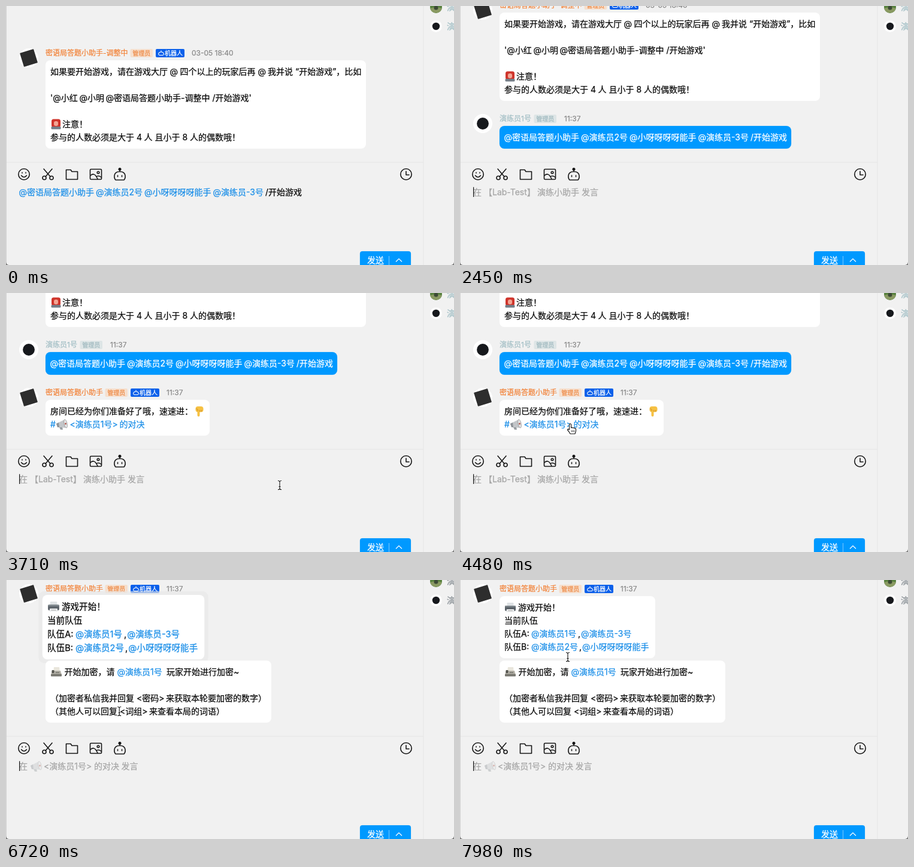
An HTML page for the animation above (8000 ms loop, 748 px wide and 434 px high).

```html
<!DOCTYPE html>
<html lang="zh-CN">
<head>
<meta charset="utf-8">
<title>群聊游戏</title>
<style>
  html, body { margin: 0; width: 100%; height: 100%; overflow: hidden; background: #f1f1f1; }
  svg { display: block; width: 748px; height: 434px; }
  text { font-family: Inter, "Noto Sans CJK SC", sans-serif; text-spacing-trim: space-all; white-space: pre; stroke-width: .25px; }
</style>
</head>
<body>
<svg id="stage" viewBox="0 0 748 434"></svg>
<script>
const LOOP = 8000, STEP = 70;
const BLUE = '#0099ff', LINK = '#1c8fe8', ORANGE = '#f28238', PALE = '#a3bfc5', GRAY = '#8a8a8a', HINT = '#a6a6a6', INK = '#0c0c0c';
const BOT = '密语局答题小助手', P1 = '演练员1号', P2 = '演练员2号', P3 = '演练员-3号', P4 = '小呀呀呀呀能手';

const esc = s => s.replace(/</g, '&lt;').replace(/>/g, '&gt;');
const text = (x, cy, s, fill = INK, size = 14, weight = 400) =>
  `<text x="${x}" y="${cy + size * 0.36}" font-size="${size}" font-weight="${weight}" fill="${fill}" stroke="${fill}">${esc(s)}</text>`;
// parts: [x, string, colour] on one line
const line = (cy, ...parts) => parts.map(([x, s, c]) => text(x, cy, s, c)).join('');
const rect = (x, y, w, h, r, fill, more = '') =>
  `<rect x="${x}" y="${y}" width="${w}" height="${h}" rx="${r}" fill="${fill}" ${more}/>`;
const circle = (x, y, r, fill, more = '') => `<circle cx="${x}" cy="${y}" r="${r}" fill="${fill}" ${more}/>`;
const path = (d, fill = 'none', more = '') => `<path d="${d}" fill="${fill}" ${more}/>`;
const group = (x, y, body, more = '') => `<g transform="translate(${x} ${y})" ${more}>${body}</g>`;
const RIM = `stroke="${BLUE}" stroke-opacity=".2"`;
const bubble = (y, w, lines, fill = '#fff', more = '') => rect(66, y, w, lines * 22 + 16, 8, fill, more);

// small pictures, centred on their position
const siren = (x, y) => group(x, y,
  rect(-7.5, -8.5, 15, 14, 3.5, '#cf352c') + rect(-3.5, -5, 7, 8, 3, '#f3a594') +
  rect(-8, 4, 16, 4.5, 1.5, '#737d87'));
const horn = (x, y, more) => group(x, y,
  path('M-9 -1L5 -8L8 6L-7 5Z', '#c3c6c9') + path('M-9 -1L-5 -3L-4 5L-7 5Z', '#8f9499') +
  path('M-4 5L-2 9H2L1 5', '#9a9fa3') +
  `<ellipse cx="6.5" cy="-1" rx="2.6" ry="7.2" transform="rotate(-12 6.5 -1)" fill="#e4e5e6" stroke="#999" stroke-width=".8"/>` +
  circle(6.5, -1, 1.5, '#b05a50'), more);
const handDown = (x, y) => group(x, y,
  rect(-6.5, -8, 13, 9.5, 4, '#f6c143') + rect(-3.5, -3, 4, 12, 2, '#f6c143') +
  path('M.8 -2V1M3.6 -2V1M-5.5 -4Q-2 -4 -3 0', 'none', 'stroke="#cc8a22" stroke-width=".9"'));
const printer = (x, y) => group(x, y,
  rect(-5.5, -8, 11, 8, 1, '#dfe3e5') + rect(-9, -3, 18, 9, 2, '#596067') +
  rect(-9, -3, 18, 2.5, 1, '#7d858b') + path('M-6 3H6L7 8H-7Z', '#eceeef') +
  path('M-4 5.5H4', 'none', 'stroke="#aaa"'));
const fax = (x, y) => group(x, y,
  path('M-4 -8H5L6 0H-5Z', '#e9e6dc') + path('M-7 -2H7L9 5V7H-9V5Z', '#b5b2a9') +
  rect(-9, 3.5, 18, 4, 1, '#77766f') + rect(-7.5, -3, 4, 5, 1, '#55554f') +
  path('M-1 1H5', 'none', 'stroke="#696961" stroke-dasharray="1.4 .8" stroke-width="2"'));

const botFace = y => circle(38, y, 16, '#fff') +
  rect(-12, -12, 24, 24, 1, '#2d2d2d', `transform="translate(38 ${y}) rotate(-17)"`);
const userFace = (x, y, r) => circle(x, y, r, '#fff') + circle(x, y, r * 0.62, '#17191d');

const tag = (x, y, bg, fg) => rect(x, y - 7, 37.5, 14, 2, bg) + text(x + 3.7, y, '管理员', fg, 10);
const badge = (x, y) => rect(x, y - 7, 48, 14, 2, '#0b60ea') +
  group(x + 9, y, path('M-2.5 3.5Q-5 3 -4 0Q-3 -2 0 -2Q3 -2 4 0Q5 3 2.5 3.5ZM0 -2V-4.5', 'none', 'stroke="#fff" stroke-width="1.1"')) +
  text(x + 15, y, '机器人', '#fff', 10, 500);
const botHead = (y, name, end, time, admin = true) => {
  const b = admin ? end + 47 : end + 5;
  return botFace(y + 8) + text(66, y, name, admin ? ORANGE : GRAY, 12) +
    (admin ? tag(end + 4.5, y, '#f6dfcd', '#ee8a46') : '') + badge(b, y) + text(b + 60, y, time, GRAY, 12);
};

const command = (x, y, c, last) => line(y, [x - 0.5, '@' + BOT, c], [x + 128, '@' + P2, c],
  [x + 209, '@' + P4, c], [x + 323.5, '@' + P3, c], [x + 411, '/开始游戏', last]);

const lobby = `
  ${botHead(79, BOT + '-调整中', 203, '03-05 18:40')}${bubble(91, 535, 6)}
  ${line(110, [74, '如果要开始游戏，请在游戏大厅'], [273.5, '@'], [290.5, '四个以上的玩家后再'], [420.5, '@'], [437, '我并说'], [483, '“开始游戏”，比如'])}
  ${line(154, [74, "'@小红"], [122.5, '@小明'], [166.5, '@' + BOT + '-调整中'], [344.5, "/开始游戏'"])}
  ${siren(83.5, 198)}${text(94, 198, '注意！')}
  ${line(220, [74, '参与的人数必须是大于'], [218, '4'], [230.5, '人'], [248.5, '且小于'], [294.5, '8'], [307, '人的偶数哦！'])}
  <g id="sent">${userFace(38, 277, 16)}${text(66, 269, P1, PALE, 12)}${tag(123.5, 269, '#dde5e6', '#9fb9bf')}${text(174, 269, '11:37', GRAY, 12)}
  ${bubble(281, 487, 1, BLUE, RIM)}${command(74, 300, '#fff', '#fff')}</g>
  <g id="reply">${botHead(349, BOT, 161, '11:37')}${bubble(361, 274, 2)}
  ${text(74, 380, '房间已经为你们准备好了哦，速速进：')}${handDown(323, 380)}
  ${text(74, 402, '#', LINK)}${horn(93, 402)}${line(402, [106.5, `<${P1}>`, LINK], [189.5, '的对决', LINK])}</g>`;

const room = `
  <g id="plainHead">${botHead(15, BOT, 161, '11:37', false)}</g>
  <g id="fullHead">${botHead(15, BOT, 161, '11:37')}</g>
  <g id="pop">${rect(60, 21, 272, 116, 9, '#e8e8e8', 'id="halo"')}${bubble(27, 260, 4)}
  ${printer(84, 46)}${text(97, 46, '游戏开始！')}${text(74, 68, '当前队伍')}
  ${line(90, [74, '队伍A:'], [119, '@' + P1, LINK], [197, ','], [202, '@' + P3, LINK])}
  ${line(112, [74, '队伍B:'], [119, '@' + P2, LINK], [199, ','], [204, '@' + P4, LINK])}</g>
  ${bubble(135, 377, 4)}${fax(84, 154)}
  ${line(154, [97.5, '开始加密，请'], [185.5, '@' + P1, LINK], [268, '玩家开始进行加密~'])}
  ${line(198, [74, '（加密者私信我并回复'], [218, '<密码>'], [267, '来获取本轮要加密的数字）'])}
  ${line(220, [74, '（其他人可以回复'], [190, '<词组>'], [239, '来查看本局的词语）'])}`;

const PEN = 'stroke="#161616" stroke-width="1.6" stroke-linecap="round" stroke-linejoin="round"';
const toolbar = `<g ${PEN} fill="none">
  ${group(30, 282, circle(0, 0, 9.2, 'none') + path('M-4.5 2Q0 7.5 4.5 2M-3 -3V-2M3 -3V-2'))}
  ${group(70, 282, circle(-6, 6, 3, 'none') + circle(6, 6, 3, 'none') + path('M-7 -9L4 4M7 -9L-4 4'))}
  ${group(110, 282, path('M-9 -7.5H-2L0 -4.5H9.5V8.5H-9.5V-7.5Z'))}
  ${group(150, 282, rect(-9.5, -8.5, 19, 17, 1.5, 'none') + circle(4, -3, 1.8, 'none') + path('M-9 2Q-3 -3 1 4Q4 1 9 5M1 4L3 8'))}
  ${group(190, 283, path('M-7 8.5Q-9.5 6 -9 1Q-8 -5.5 0 -5.5Q8 -5.5 9 1Q9.5 6 7 8.5ZM0 -6V-8M-3.5 1V3M3.5 1V3') + circle(0, -9.5, 1.7, '#161616'))}
  ${group(668, 282, circle(0, 0, 9.2, 'none') + path('M0 -5V1H5'))}</g>`;

const composer = `${rect(0, 262, 748, 172, 0, '#f1f1f1')}${rect(1, 261.5, 696, 1, 0, '#e6e6e6')}${toolbar}
  <g id="draft">${command(22, 312, LINK, INK)}</g>
  <g id="hintLobby">${line(312, [22, '在', HINT], [40, '【Lab-Test】', HINT], [129, '演练小助手', HINT], [203, '发言', HINT])}</g>
  <g id="hintRoom">${text(22, 312, '在', HINT)}${horn(50, 312, 'opacity=".4"')}
  ${line(312, [63, `<${P1}>`, HINT], [147, '的对决', HINT], [192.5, '发言', HINT])}</g>
  ${rect(22, 303.5, 1.2, 16.5, 0, '#111', 'id="caret"')}
  ${rect(591, 411, 85, 40, 4, BLUE, RIM)}${text(603, 426, '发送', '#fff')}${rect(639, 419, 1, 15, 0, '#7cc9ff')}
  ${path('M651 428.5L656 423.5L661 428.5', 'none', 'stroke="#fff" stroke-width="1.2"')}`;

const side = `${rect(696.5, 0, 1, 434, 0, '#e6e6e6')}
  <g id="members">${circle(718, 2, 10, '#55803c')}${path('M708.3 4Q718 0 727.7 4A10 10 0 0 1 708.3 4Z', '#8a9a62')}${circle(718, 3, 3.5, '#3c4a35')}
  ${userFace(718, 34, 10)}<g id="memberNames">${text(736, 2, '演', 'currentColor')}${text(736, 34, '演', 'currentColor')}</g></g>`;

const BEAM = 'M-3 -7.5Q0 -7.5 0 -5.5Q0 -7.5 3 -7.5M0 -6V6M-3 7.5Q0 7.5 0 5.5Q0 7.5 3 7.5M-1.5 2.5H1.5';
const pointers = `<g id="pointer">
  <g id="beam">${path(BEAM, 'none', 'stroke="#fff" stroke-width="2.6"')}${path(BEAM, 'none', 'stroke="#111" stroke-width="1.1"')}</g>
  <g id="arrow">${path('M0 0V14L3.3 11L5.6 16L8 15L5.8 10.2H10Z', '#111', 'stroke="#fff"')}</g>
  <g id="hand">${path('M-1.5 1Q0 -1 1.5 1V7Q3 5.5 4.3 7.2Q6 6 7 7.8Q9.5 7 9.5 9.5V12Q9 14 8 17H0Q-2 13 -4.5 10.5Q-4.5 8 -1.5 10Z', '#fff', 'stroke="#111" stroke-width="1.1" stroke-linejoin="round"')}
  ${path('M2.2 11V14M4.4 11V14M6.6 11V14', 'none', 'stroke="#111" stroke-width=".8"')}</g></g>`;

const stage = document.getElementById('stage');
stage.innerHTML = `<defs><clipPath id="chat"><rect width="697" height="262"/></clipPath></defs>
  ${rect(0, 0, 748, 434, 0, '#f1f1f1')}
  <g clip-path="url(#chat)"><g id="lobby">${lobby}</g><g id="room">${room}</g></g>
  ${composer}${side}${rect(0, 0, 1, 434, 0, '#d2d2d2')}
  ${path('M0 429Q.6 433.4 5 434H0ZM748 429Q747.4 433.4 743 434H748Z', '#777')}${pointers}`;

const el = {};
stage.querySelectorAll('[id]').forEach(n => el[n.id] = n);
const show = (id, on) => el[id].style.display = on ? '' : 'none';
const clamp = v => Math.max(0, Math.min(1, v));

// The caret restarts its blink whenever the input regains focus.
const BLINK = 525, FOCUS = [280, 5495];
const caretOn = t => {
  const from = FOCUS.findLast(f => f <= t);
  return from !== undefined && Math.floor((t - from) / BLINK) % 2 === 0;
};

const POP = { from: 6510, to: 7420, grow: 0.061 };
const TRACK = [
  [3710, 457, 322, 'beam'], [3780, 412, 252, 'arrow'], [3850, 350, 172, 'arrow'], [3920, 284, 124, 'arrow'],
  [4060, 208, 168, 'arrow'], [4200, 184, 219, 'hand'], [5390, 184, 219, 'hand'], [5460, 185, 219, 'beam'],
  [6020, 185, 219, 'beam'], [6090, 184, 220, 'beam'], [6440, 184, 220, 'beam'], [7140, 197, 220, 'beam'],
  [7350, 196, 212, 'beam'], [7980, 180, 129, 'beam']
];

function movePointer(t) {
  const i = TRACK.findLastIndex(k => k[0] <= t);
  show('pointer', i >= 0);
  if (i < 0) return;
  const a = TRACK[i], b = TRACK[i + 1] || a;
  const p = a === b ? 0 : (t - a[0]) / (b[0] - a[0]);
  const at = n => a[n] + (b[n] - a[n]) * p;
  el.pointer.setAttribute('transform', `translate(${at(1)} ${at(2)})`);
  for (const kind of ['beam', 'arrow', 'hand']) show(kind, kind === a[3]);
}

function draw(now) {
  const t = Math.floor((now % LOOP) / STEP) * STEP;
  const cleared = t >= 280, sent = t >= 350, replied = t >= 2520, inRoom = t >= 5460, loaded = t >= 6440;

  show('lobby', !inRoom);
  show('sent', sent);
  show('reply', replied);
  el.lobby.setAttribute('transform', `translate(0 ${replied ? -182 : sent ? -80 : 0})`);

  show('room', inRoom);
  show('plainHead', !loaded);
  show('fullHead', loaded);
  const pop = Math.sin(Math.PI * clamp((t - POP.from) / (POP.to - POP.from)));
  el.pop.setAttribute('transform', `translate(196 79) scale(${1 + POP.grow * pop}) translate(-196 -79)`);
  el.halo.setAttribute('opacity', pop);

  show('draft', !cleared);
  show('hintLobby', cleared && !inRoom);
  show('hintRoom', inRoom);
  show('caret', caretOn(t));
  show('members', !inRoom || loaded);
  el.memberNames.style.color = inRoom ? '#8b9297' : PALE;
  movePointer(t);
}

const start = performance.now();
(function tick() {
  draw(performance.now() - start);
  requestAnimationFrame(tick);
})();
</script>
</body>
</html>
```
